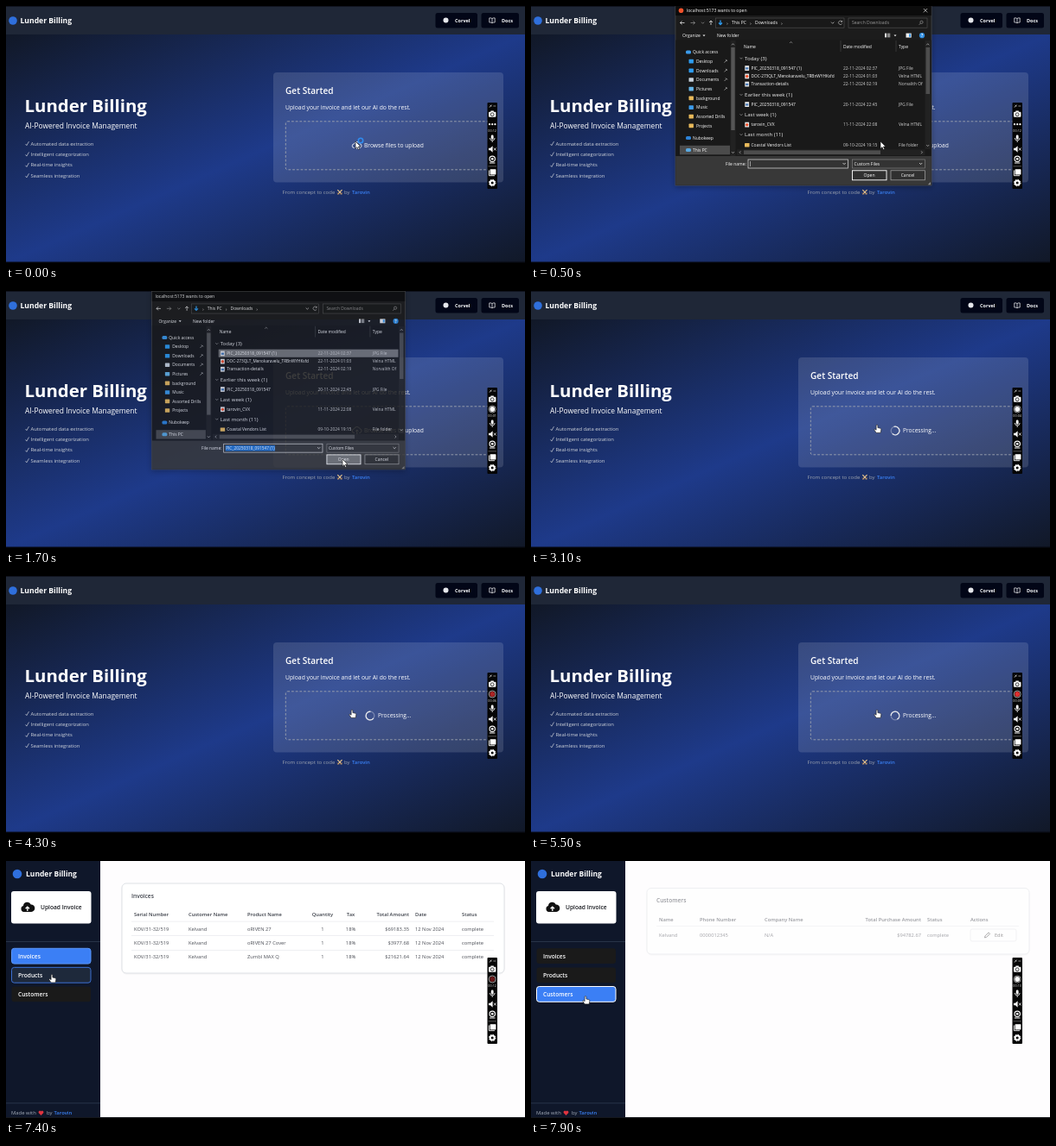
Animation, 600 px wide and 298 px high, one loop 8000 ms. Source, as an HTML page:

```html
<!DOCTYPE html>
<html lang="en">
<head>
<meta charset="utf-8">
<title>Lunder Billing</title>
<style>
html, body { margin: 0; width: 100%; height: 100%; overflow: hidden; background: #111827; }
svg { display: block; width: 100vw; height: 100vh; font-family: "Open Sans", "Noto Sans", sans-serif; }
text { white-space: pre; }
</style>
</head>
<body>
<svg id="stage" viewBox="0 0 600 298" xmlns="http://www.w3.org/2000/svg"></svg>
<script>
const LOOP = 8000, STEP = 100;
const BRAND = "Lunder Billing", AUTHOR = "Tarovin", BUYER = "Kelvand";

// y is the middle of the capital letters
const text = (x, y, str, size, fill = "#fff", weight = 400, anchor = "start") =>
  `<text x="${x}" y="${y + size * .36}" font-size="${size}" fill="${fill}" font-weight="${weight}" text-anchor="${anchor}">${str}</text>`;
const rect = (x, y, w, h, fill, extra = "") =>
  `<rect x="${x}" y="${y}" width="${w}" height="${h}" fill="${fill}" ${extra}/>`;
const disc = (x, y, r, fill, extra = "") =>
  `<circle cx="${x}" cy="${y}" r="${r}" fill="${fill}" ${extra}/>`;
const line = (d, color = "#fff", width = .7, extra = "") =>
  `<path d="${d}" fill="none" stroke="${color}" stroke-width="${width}" ${extra}/>`;
const shape = (d, fill = "#fff", extra = "") => `<path d="${d}" fill="${fill}" ${extra}/>`;
const group = (id, body, extra = "") => `<g id="${id}" ${extra}>${body}</g>`;

function landing() {
  const perks = ["Automated data extraction", "Intelligent categorization", "Real-time insights", "Seamless integration"];
  return rect(0, 33, 600, 265, "url(#sky)")
    + rect(0, 0, 600, 33, "#1f2737") + rect(0, 0, 600, 1, "#10141f")
    + disc(8, 17, 4.8, "#2f6fdc") + text(16.5, 17, BRAND, 8.6, "#fff", 700)
    + rect(496.5, 8, 48.5, 17.5, "#020617", 'rx="2.5"') + disc(508.5, 16.5, 3, "#e5e7eb")
    + text(519, 16.8, "Corvel", 5.5, "#fff", 700)
    + rect(549.5, 8, 43.5, 17.5, "#020617", 'rx="2.5"')
    + line("M562 14.5Q560.5 13.6 558.8 13.9V19Q560.8 18.8 562 19.8Q563.2 18.8 565.2 19V13.9Q563.5 13.6 562 14.5V19.8")
    + text(573, 16.8, "Docs", 5.5, "#fff", 700)
    + text(21.5, 115.5, BRAND, 20.4, "#fff", 700)
    + text(22, 138.7, "AI-Powered Invoice Management", 8.46)
    + perks.map((p, i) => line(`M22.5 ${160 + i * 12.4}l1.4 1.7 2.6 -4.6`, "#d1d5db", .7)
      + text(28.5, 159.5 + i * 12.4, p, 5.85, "#d1d5db")).join("")
    + rect(309, 77, 266, 127.5, "#fff", 'rx="4" fill-opacity=".13"')
    + text(323, 98.5, "Get Started", 10.1, "#fff", 600)
    + text(323, 117.5, "Upload your invoice and let our AI do the rest.", 6.78)
    + rect(323.3, 133.8, 238, 56, "#fff", 'fill-opacity=".025" rx="2" stroke="#9ca3af" stroke-width=".9" stroke-dasharray="2.8 1.9"')
    + group("browse", line("M403 164.5h-.5a2.3 2.3 0 0 1 0 -4.6a3.4 3.4 0 0 1 6.4 -.3a2.5 2.5 0 0 1 .2 4.9h-.8M405.8 166v-5l-1.6 1.6M405.8 161l1.6 1.6", "#fff", .8)
      + text(414, 161.7, "Browse files to upload", 6.7))
    + group("busy", disc(421, 162, 4.8, "none", 'stroke="#fff" stroke-opacity=".3" stroke-width="1.3"')
      + group("spin", line("M416.2 162a4.8 4.8 0 0 1 9 -2.4a4.8 4.8 0 0 1 -1.8 6.5", "#e5e7eb", 1.3))
      + text(430, 162, "Processing...", 6.6))
    + text(319.5, 216, "From concept to code", 6, "#9ca3af")
    + line("M383.3 213.2l5 5.2M388.5 213.2l-5 5.2", "#e9c48c", 1.2)
    + line("M383 216.5l2 2M388.8 216.5l-2 2", "#b5763c", .8)
    + text(391, 216, "by", 6, "#9ca3af") + text(400, 216, AUTHOR, 5.9, "#3b82f6", 600)
    + rect(0, 296.6, 600, 1.4, "#05070d");
}

function fileIcon(x, y, kind) {
  if (kind === "folder") return rect(x - 2.5, y - 2, 5.5, 4.4, "#e8b95a", 'rx=".4"');
  const page = rect(x - 2.2, y - 2.8, 4.8, 5.8, "#e8e8e8");
  return page + (kind === "web" ? disc(x + .2, y + .2, 1.7, "#f0522b") : rect(x - 1.4, y - .8, 3.2, 2.4, "#4b7cb8"));
}

function dialog() {
  const ink = "#fff", dim = "#d2d2d2", S = 4.95;
  const side = [[53.5, "Quick access", 187, "#3c9bea"], [64, "Desktop", 191, "#2d9cf0"], [74.8, "Downloads", 191, "#2d9cf0"],
    [85.4, "Documents", 191, "#c9d3dd"], [96, "Pictures", 191, "#65b5e8"], [106.8, "background", 191, "#e8b95a"],
    [117.5, "Music", 191, "#3c9bea"], [128, "Assorted Drills", 191, "#e8b95a"], [138.8, "Projects", 191, "#e8b95a"],
    [153, "Nubokeep", 187, "#2d83d8"], [167, "This PC", 187, "#5aa9e0"]];
  const groups = [[60.5, "Today (3)"], [102.8, "Earlier this week (1)"], [126, "Last week (1)"], [149, "Last month (11)"]];
  const files = [[72, "PIC_20250318_091547 (1)", "22-11-2024 02:37", "JPG File"],
    [81.3, "DOC-273QLT_Menokaravelu_TRBnWYHKsfd", "22-11-2024 01:03", "Velna HTML", "web"],
    [90.5, "Transaction-details", "22-11-2024 02:19", "Norvalith Of"],
    [114, "PIC_20250318_091547", "20-11-2024 22:45", "JPG File"],
    [137.5, "tarovin_CVX", "11-11-2024 22:08", "Velna HTML", "web"],
    [161, "Coastal Vendors List", "09-10-2024 19:15", "File folder", "folder"]];
  return rect(167, -1, 296, 209, "#1d1d1d", 'stroke="#4a4a4a" stroke-width=".7" filter="url(#shadow)"')
    + rect(167.3, 0, 295.4, 11, "#0c0c0c") + rect(167.3, 174, 295.4, 33.6, "#383838")
    + group("titleMarks", disc(173.5, 5.2, 2.8, "#f0522b") + line("M453.8 3l4.4 4.4M458.2 3l-4.4 4.4", ink, .6))
    + group("title", text(180, 5.2, "localhost:5173 wants to open", 5.1, ink))
    + line("M177.5 19.5h-5m2 -2l-2 2 2 2", ink) + line("M184.5 19.5h5m-2 -2l2 2 -2 2", "#999")
    + line("M197 18.7l1.6 1.6 1.6 -1.6", "#999") + line("M208 22v-5m-2 2l2 -2 2 2", ink)
    + rect(213.5, 14, 148.5, 11.2, "#191919", 'stroke="#555" stroke-width=".6"')
    + line("M219 16.5v5m-2 -2l2 2 2 -2", "#2d9cf0", 1.3)
    + text(226, 19.5, "›", 6, dim) + text(232, 19.5, "This PC", 5, ink) + text(253, 19.5, "›", 6, dim)
    + text(259, 19.5, "Downloads", 5, ink) + text(289, 19.5, "›", 6, dim)
    + line("M347 18.6l1.7 1.7 1.7 -1.7", dim) + line("M359.5 18a2.2 2.2 0 1 0 .2 2.3M359.7 16.8v1.6h-1.6", dim, .6)
    + rect(367, 14, 91, 11.2, "#191919", 'stroke="#555" stroke-width=".6"')
    + text(371, 19.5, "Search Downloads", 5, "#999") + disc(451.5, 18.8, 1.6, "none", 'stroke="#aaa" stroke-width=".6"') + line("M450.4 20l-1.8 1.9", "#aaa", .6)
    + text(175, 34.2, "Organize", 5, ink) + shape("M198.5 33.5h3l-1.5 1.8z", ink) + text(215, 34.2, "New folder", 5, ink)
    + rect(409, 31.6, 2.2, 4.8, "#ddd") + rect(412, 31.6, 3.3, 4.8, "#888") + shape("M419.5 33.5h3l-1.5 1.8z", ink)
    + rect(433.5, 31.6, 6.2, 5, "#eee") + rect(437, 32.4, 2, 3.4, "#3c9bea")
    + disc(452, 34.2, 3.1, "#2f8de0") + text(452, 34.2, "?", 4.5, "#fff", 700, "middle")
    + rect(167.3, 39.5, 295.4, 134.5, "#191919")
    + rect(172, 161.8, 58, 10.5, "#4b4b4b")
    + side.map(([y, name, x, color], i) =>
      (i && i < 9 ? rect(x - 8.5, y - 2.2, 5.4, 4.6, color, 'rx=".6"') : rect(x - 8, y - 2, 6, 4, color, 'rx="1.6"'))
      + text(x, y, name, S, ink)
      + (i > 0 && i < 5 ? line(`M223.5 ${y + 1.6}l3 -3m-1.6 -.6l2.1 2.1`, dim, .6) : "")).join("")
    + rect(230.5, 40, 6, 134, "#222") + rect(231.3, 48, 4.4, 96, "#555")
    + line("M232 45.3l1.5 -1.6 1.5 1.6M232 169l1.5 1.6 1.5 -1.6", dim, .6)
    + text(246, 46.8, "Name", S, ink) + text(361, 46.8, "Date modified", S, ink) + text(425, 46.8, "Type", S, ink)
    + line("M299 43l1.6 -1.5 1.6 1.5", dim, .5) + line("M358 40v13M422 40v13", "#555", .5)
    + `<rect id="rowMark" x="245" y="67.3" width="210" height="9.2"/>`
    + groups.map(([y, name]) => line(`M241.5 ${y - .7}l1.5 1.5 1.5 -1.5`, dim, .5) + text(247, y, name, 6.1, "#f0f0f0")).join("")
    + files.map(([y, name, date, type, kind]) => fileIcon(249.5, y, kind)
      + text(254.5, y, name, name.length > 30 ? 4.75 : S, ink) + text(361, y, date, 4.9, dim) + text(425, y, type, 4.9, dim)).join("")
    + rect(455.5, 40, 6.5, 126, "#222") + rect(456.5, 48, 4.5, 54, "#4d4d4d")
    + line("M457.2 45.3l1.5 -1.6 1.5 1.6M457.2 161l1.5 1.6 1.5 -1.6", dim, .6)
    + rect(238, 166.3, 217.5, 6.8, "#222") + rect(246, 167.4, 158, 4.6, "#4d4d4d")
    + line("M242.5 168.2l-1.5 1.5 1.5 1.5M451 168.2l1.5 1.5 -1.5 1.5", dim, .6)
    + text(225, 183, "File name:", 5, ink)
    + rect(251, 178, 115.5, 10, "#343434", 'stroke="#e0e0e0" stroke-width=".7"')
    + group("chosen", rect(253, 179.8, 58, 6.6, "#2474cf") + text(253.5, 183, files[0][1], 4.85))
    + group("caret", rect(253.5, 180, .5, 6, "#fff"))
    + line("M360.5 182l1.6 1.6 1.6 -1.6", ink)
    + rect(371.5, 178, 84, 10, "#333", 'stroke="#8a8a8a" stroke-width=".6"') + text(373.5, 183, "Custom Files", 5, ink)
    + line("M449 182l1.6 1.6 1.6 -1.6", ink)
    + `<rect id="open" x="371.5" y="190.8" width="39.5" height="11" stroke="#fff" stroke-width=".9"/>`
    + text(391, 196.3, "Open", 5.1, ink, 400, "middle")
    + rect(416, 190.8, 39.5, 11, "#303030", 'stroke="#aaa" stroke-width=".7"') + text(435.5, 196.3, "Cancel", 5.1, ink, 400, "middle")
    + shape("M462 204v3.3h-3.3z", "#888");
}

const NAV = ["Invoices", "Products", "Customers"];

function table(title, bottom, cols, rows, extra = "") {
  const ink = "#3b3f48";
  const cells = (row, y, size, weight, color) =>
    row.map((cell, i) => text(cols[i][1], y, cell, size, color, weight, cols[i][2])).join("");
  return group("page" + title, rect(134, 26, 442, bottom - 26, "#fff", 'rx="5" stroke="#dcdfe4" stroke-width=".9" filter="url(#soft)"')
    + text(145, 40.3, title, 6.6, ink, 600)
    + cells(cols.map(c => c[0]), 62, 5.75, 600, ink)
    + rows.map((row, i) => rect(145, 69.8 + i * 16.6, 419, .6, "#e3e5e9")
      + cells(row, (extra ? 80.5 : 78.6) + i * 16.4, 5.75, 400, "#4a4d55")).join("") + extra);
}

function dashboard() {
  const goods = [["oRIVEN 27", "$69183.35"], ["oRIVEN 27 Cover", "$3977.68"], ["Zumbl MAX Q", "$21621.64"]];
  const editButton = rect(508, 73.5, 53, 14, "#fff", 'rx="2" stroke="#e1e4e8" stroke-width=".8"')
    + line("M524.5 83.4l.5 -2 4 -4 1.5 1.5 -4 4z", "#333", .8) + text(536, 80.5, "Edit", 5.6, "#333");
  return rect(0, 0, 600, 298, "#fefdfe") + rect(0, 0, 109, 298, "#0f172a")
    + disc(13, 15, 5.3, "#2f6fdc") + text(23, 15, BRAND, 8.5, "#fff", 700)
    + rect(6, 35, 92.5, 37.5, "#fff", 'rx="3"')
    + shape("M20.5 59a3.6 3.6 0 0 1 -.5 -7a4.6 4.6 0 0 1 8.8 -1.5a4.2 4.2 0 0 1 .5 8.5z", "#111")
    + line("M24.8 58v-4.7m-2.2 2l2.2 -2.2 2.2 2.2", "#fff", 1.3)
    + text(40, 54, "Upload Invoice", 6.65, "#16181d", 600)
    + rect(0, 93, 109, .7, "#334155") + rect(0, 280.5, 109, .7, "#334155")
    + NAV.map((name, i) => `<rect id="nav${i}" x="6.5" y="${101.3 + i * 22.1}" width="91.5" height="17.8" rx="3" stroke-width="1"/>`
      + text(14, 110.5 + i * 22.1, name, 6.6, "#fff", 600)).join("")
    + text(6, 292, "Made with", 5.9, "#a3abb8")
    + shape("M40.5 295l-2.6 -2.7a1.5 1.5 0 0 1 2.6 -2a1.5 1.5 0 0 1 2.6 2z", "#e0343f")
    + text(47, 292, "by", 5.9, "#a3abb8") + text(55.5, 292, AUTHOR, 5.9, "#3b82f6", 600)
    + table("Invoices", 130, [["Serial Number", 148], ["Customer Name", 211], ["Product Name", 279], ["Quantity", 366, "middle"],
      ["Tax", 398.5, "middle"], ["Total Amount", 466, "end"], ["Date", 473], ["Status", 527]],
      goods.map(([name, sum]) => ["KOV/31-32/519", BUYER, name, "1", "18%", sum, "12 Nov 2024", "complete"]))
    + table("Products", 130, [["Product Name", 148], ["Quantity", 290, "middle"], ["Tax", 350, "middle"], ["Total Amount", 451, "end"], ["Status", 458]],
      goods.map(([name, sum]) => [name, "1", "18%", sum, "complete"]))
    + table("Customers", 102.5, [["Name", 148], ["Phone Number", 195], ["Company Name", 270], ["Total Purchase Amount", 451, "end"], ["Status", 458], ["Actions", 508]],
      [[BUYER, "0000012345", "N/A", "$94782.67", "complete", ""]], editButton)
    + rect(0, 297, 600, 1, "#15171c");
}

function recorder() {
  return rect(556.5, 112, 11.5, 100, "#050505", 'rx="1"')
    + line("M559 117.5l2.4 -2.8m-1.6 .2l1.5 1.4", "#ddd", .9) + line("M563.3 116h3", "#ddd", .6)
    + rect(558, 122.7, 8.4, 6, "#fff", 'rx="1"') + rect(560.4, 121.5, 3.4, 2, "#fff") + disc(562.2, 125.7, 1.9, "#fff", 'stroke="#111" stroke-width=".8"')
    + group("dots", [559, 562.2, 565.4].map(x => disc(x, 137.2, 1.1, "#fff")).join(""))
    + group("record", disc(562.2, 137, 4, "none", 'stroke="#ddd" stroke-width=".7"') + '<circle id="lamp" cx="562.2" cy="137" r="2.9"/>')
    + `<text id="clock" x="562.2" y="146.3" font-size="3.8" fill="#ddd" text-anchor="middle"></text>`
    + rect(560.8, 149.5, 2.8, 5.2, "#fff", 'rx="1.4"') + line("M559.3 153a2.9 2.9 0 0 0 5.8 0M562.2 156v2", "#fff", .8)
    + shape("M558 164.7h2l2.6 -2.4v7.4l-2.6 -2.4h-2z") + line("M564 164.5l2.6 3M566.6 164.5l-2.6 3", "#fff", .8)
    + disc(562.2, 177.3, 3.2, "none", 'stroke="#fff" stroke-width="1.1"') + disc(562.2, 177.3, 1.4, "#fff") + line("M559 182h6.4", "#fff", 1)
    + rect(557.5, 185.6, 9.5, .6, "#888")
    + line("M558.4 190.5v6.2h6.6", "#fff", .9) + rect(559.6, 189.2, 6.8, 6.2, "#fff", 'rx=".5"')
    + disc(562.2, 205, 2.5, "none", 'stroke="#fff" stroke-width="2"')
    + disc(562.2, 205, 3.8, "none", 'stroke="#fff" stroke-width="1" stroke-dasharray="1.5 1.485"');
}

function pointers() {
  const edge = 'stroke="#111" stroke-width=".6" stroke-linejoin="round"';
  return group("arrow", shape("M0 0V8.4L2 6.6L3.3 9.6L4.7 9L3.4 6.1H6z", "#fff", edge))
    + group("wait", disc(6, -1, 2.7, "none", 'stroke="#2f8cf0" stroke-width="1.6"'))
    + group("hand", shape("M-.9 .7Q0 -.7 .9 .7V3.5L4.1 4.3Q5 4.6 4.8 5.8L4.2 9.4H-.9L-3.2 6Q-3 4.6 -1.9 5.4L-.9 6.2z", "#fff", edge));
}

const stage = document.getElementById("stage");
stage.innerHTML = `<defs>
  <linearGradient id="sky" x1="0" y1="0" x2="1" y2="1"><stop offset="0" stop-color="#111827"/><stop offset=".5" stop-color="#1e3a8a"/><stop offset="1" stop-color="#111827"/></linearGradient>
  <filter id="shadow"><feDropShadow dx="0" dy="2" stdDeviation="3" flood-opacity=".3"/></filter>
  <filter id="soft"><feDropShadow dx="0" dy=".5" stdDeviation=".7" flood-opacity=".1"/></filter>
</defs>` + group("landing", landing()) + group("dialog", dialog()) + group("dashboard", dashboard())
  + group("recorder", recorder()) + group("pointer", pointers());

const el = id => document.getElementById(id);
const show = (id, on) => el(id).setAttribute("display", on ? "inline" : "none");
const set = (id, name, value) => el(id).setAttribute(name, value);
const clamp = v => Math.max(0, Math.min(1, v));

const AT = { dialog: 300, record: 1000, pick: 1300, close: 1650, busy: 1900, dash: 6700, products: 7500, customers: 7800 };
const PATH = [[0, 404, 157], [500, 404, 157], [1000, 304, 75], [1300, 304, 75], [1600, 389, 195],
  [1800, 389, 195], [2200, 400, 155], [6700, 400, 155], [7300, 53, 131.5], [7500, 53, 131.5], [7800, 63, 156.5], [8000, 63, 156.5]];

function pointerAt(t) {
  const i = PATH.findIndex((p, n) => n && t <= p[0]);
  const [a, b] = [PATH[i - 1], PATH[i]];
  const k = (t - a[0]) / (b[0] - a[0]), ease = k * k * (3 - 2 * k);
  return [a[1] + (b[1] - a[1]) * ease, a[2] + (b[2] - a[2]) * ease];
}

function drawDialog(t) {
  const closing = clamp((t - AT.close) / 240), picked = t >= AT.pick;
  show("dialog", t >= AT.dialog && closing < 1);
  set("dialog", "opacity", 1 - closing * .8);
  set("dialog", "transform", `translate(315 104) scale(${1 - closing * .05}) translate(-315 -104)`);
  show("titleMarks", closing === 0);
  set("title", "transform", `translate(${closing ? -9 : 0} 0)`);
  show("rowMark", t >= 1000);
  set("rowMark", "fill", picked ? "#777" : "#4d4d4d");
  show("chosen", picked);
  show("caret", !picked);
  set("open", "fill", t >= 1600 ? "#767676" : "#303030");
}

function drawDashboard(t, x, y) {
  const page = t >= AT.customers ? 2 : t >= AT.products ? 1 : 0;
  const entered = clamp((t - [AT.dash, AT.products, AT.customers][page]) / 200);
  show("dashboard", t >= AT.dash);
  NAV.forEach((name, i) => {
    const top = 101 + i * 22.1;
    const hover = x < 98 && y > top && y < top + 18;
    show("page" + name, i === page);
    set("page" + name, "opacity", entered);
    set("page" + name, "transform", `translate(0 ${(1 - entered) * 11})`);
    set("nav" + i, "fill", i === page ? "#3b7ff5" : hover ? "#1e293b" : "#1a1a1a");
    set("nav" + i, "stroke", i !== page ? (hover ? "#3b6fd0" : "none") : page ? "#fff" : "#5b96f7");
  });
}

function drawRecorder(t) {
  const recording = t >= AT.record, blink = (t - AT.record) / 530;
  const red = Math.floor(blink) % 2 === 0;
  show("dots", !recording);
  show("record", recording);
  set("lamp", "fill", red ? "#e03030" : "#fff");
  set("lamp", "opacity", red ? .3 + .7 * Math.abs(Math.sin(Math.PI * blink)) : 1);
  const seconds = recording ? Math.floor((t - AT.record) / 500) : 12;
  el("clock").textContent = "00:" + String(seconds).padStart(2, "0");
}

function draw(t) {
  const [x, y] = pointerAt(t);
  show("landing", t < AT.dash);
  show("browse", t < AT.busy);
  show("busy", t >= AT.busy);
  set("spin", "transform", `rotate(${t * .72 % 360} 421 162)`);
  drawDialog(t);
  drawDashboard(t, x, y);
  drawRecorder(t);

  const hand = t >= 2000;
  set("pointer", "transform", `translate(${x} ${y})`);
  show("arrow", !hand);
  show("wait", t < AT.dialog);
  show("hand", hand);
}

const start = performance.now();
function tick() {
  const t = (performance.now() - start) % LOOP;
  draw(Math.floor(t / STEP) * STEP);
  requestAnimationFrame(tick);
}
tick();
</script>
</body>
</html>
```
